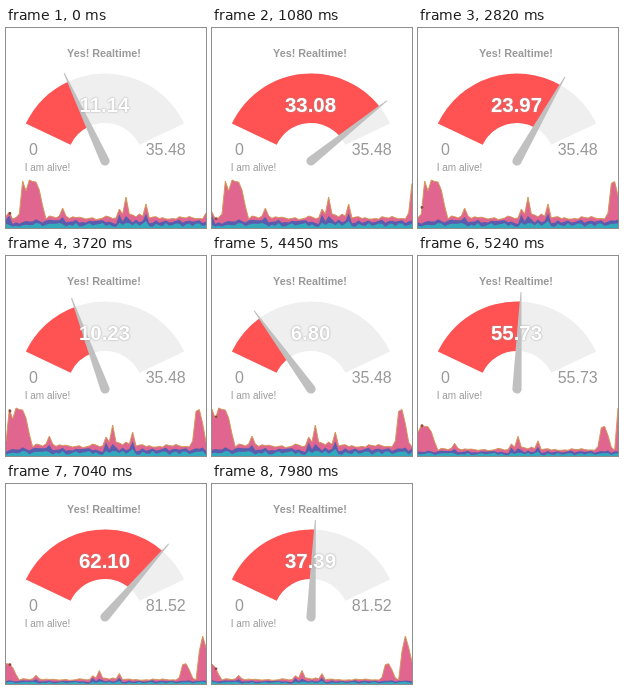
An HTML page for the animation above (8 s loop, 200x200 px).

```html
<!DOCTYPE html>
<html>
<head>
<meta charset="utf-8">
<style>
html, body { margin: 0; width: 100%; height: 100%; overflow: hidden; background: #fff; }
svg { display: block; width: 100vw; height: 100vh; }
text { font-family: Arial, "Liberation Sans", sans-serif; text-anchor: middle; fill: #999; }
#value { font-size: 20.4px; font-weight: bold; fill: #fff; text-shadow: 0 0 2px #999; }
</style>
</head>
<body>
<svg viewBox="0 0 200 200">
  <text x="98" y="29" font-size="10.8" font-weight="bold">Yes! Realtime!</text>
  <path id="track" fill="#efefef"/>
  <path id="level" fill="#ff5252"/>
  <path id="needle" d="M-.5-97 .5-97 4.6 0A4.6 4.6 0 0 1-4.6 0Z" fill="#c0c0c0"/>
  <text id="value" x="98.5" y="84"></text>
  <text x="27.5" y="127" font-size="16">0</text>
  <text id="max" x="159.7" y="127" font-size="16"></text>
  <text x="41.5" y="142.5" font-size="10">I am alive!</text>
  <path id="pink" fill="#e0658f"/>
  <path id="indigo" fill="#5b5cae"/>
  <path id="teal" fill="#32a9bd"/>
  <path id="line" fill="none" stroke="#d39a58"/>
  <circle id="dot" cx="4" r="1.4" fill="#8a4a3c"/>
</svg>
<script>
const LOOP = 8000, CX = 99, CY = 133, OUTER = 87.5, INNER = 38;
const FROM = 25.3, SWEEP = 129.4, GAP = 10 / 3, COUNT = 60, FIRST_MAX = 35.48;

// time, value, maximum, time constant of the needle
const updates = [
  [150, 33.08, 35.48, 320],
  [1220, 34.35, 35.48, 320],
  [2280, 23.97, 35.48, 320],
  [3080, 10.23, 35.48, 320],
  [4010, 6.8, 35.48, 320],
  [5050, 55.73, 55.73, 320],
  [5600, 81.52, 81.52, 320],
  [6600, 62.1, 81.52, 320],
  [7800, 37.39, 81.52, 112]
];

const el = id => document.getElementById(id);
const set = (id, name, v) => el(id).setAttribute(name, v);
const noise = n => { const v = Math.sin(n * 12.9898) * 43758.5453; return v - Math.floor(v); };

// Heights in px at the first scale; everything else is low noise.
const bumps = {
  0: 12, 1: 16, 2: 9, 4: 14, 5: 47, 6: 37, 7: 48, 8: 46.5, 9: 46, 10: 38, 11: 22, 12: 9,
  16: 12, 17: 20, 18: 12, 34: 19, 35: 14, 36: 31, 37: 14, 38: 13, 40: 14, 42: 24, 43: 10
};
const series = Array.from({ length: COUNT + 1 }, (_, i) =>
  (bumps[i] || 8.5 + 3.5 * noise(i)) * FIRST_MAX / 48);
series[COUNT] = 11.14;
for (const u of updates) series.push(u[1]);

const unit = FIRST_MAX / 48;
const layers = series.map((total, i) => {
  const peak = i <= COUNT && bumps[i] > 18 && i > 12 ? 4 : 0;
  const teal = (1.2 + 4 * noise(i + 80) + peak / 2) * unit;
  const indigo = Math.min(total * 0.82, teal + (2.4 + 2 * noise(i + 160) + peak + (i === 1 ? 6 : 0)) * unit);
  return { total, teal: Math.min(teal, indigo), indigo };
});

function point(ratio, r) {
  const a = (FROM + SWEEP * ratio) * Math.PI / 180;
  return (CX - r * Math.cos(a)).toFixed(2) + " " + (CY - r * Math.sin(a)).toFixed(2);
}

function sector(ratio) {
  return `M${point(0, OUTER)}A${OUTER} ${OUTER} 0 0 1 ${point(ratio, OUTER)}` +
    `L${point(ratio, INNER)}A${INNER} ${INNER} 0 0 0 ${point(0, INNER)}Z`;
}

function stateAt(t) {
  let shown = 10.9, value = 11.14, max = FIRST_MAX, step = 0;
  for (let i = 0; i < updates.length && updates[i][0] <= t; i++) {
    const [start, v, m, tau] = updates[i];
    const end = i + 1 < updates.length ? Math.min(t, updates[i + 1][0]) : t;
    shown = v + (shown - v) * Math.exp((start - end) / tau);
    value = v;
    max = m;
    step = i + 1;
  }
  return { shown, value, max, step };
}

function drawChart(step, max) {
  const visible = layers.slice(step, step + COUNT + 1);
  const y = v => 200 - v * 48 / max;
  const trace = key => "M" + visible.map((p, i) =>
    (i * GAP).toFixed(2) + " " + y(p[key]).toFixed(2)).join("L");
  const area = key => trace(key) + "L200 200 0 200Z";
  set("pink", "d", area("total"));
  set("indigo", "d", area("indigo"));
  set("teal", "d", area("teal"));
  set("line", "d", trace("total"));
  const f = 4 / GAP - 1;
  set("dot", "cy", y(visible[1].total * (1 - f) + visible[2].total * f));
}

let drawn = -1;
function frame(now) {
  const s = stateAt(now % LOOP), ratio = s.shown / s.max;
  set("level", "d", sector(ratio));
  set("needle", "transform", `translate(${CX} ${CY}) rotate(${FROM + SWEEP * ratio - 90})`);
  if (s.step !== drawn) {
    drawn = s.step;
    el("value").textContent = s.value.toFixed(2);
    el("max").textContent = s.max.toFixed(2);
    drawChart(s.step, s.max);
  }
  requestAnimationFrame(frame);
}

set("track", "d", sector(1));
const origin = performance.now();
const tick = () => frame(performance.now() - origin);
const raw = frame;
frame = function (now) { raw(Math.max(0, now - origin)); };
tick();
</script>
</body>
</html>
```
